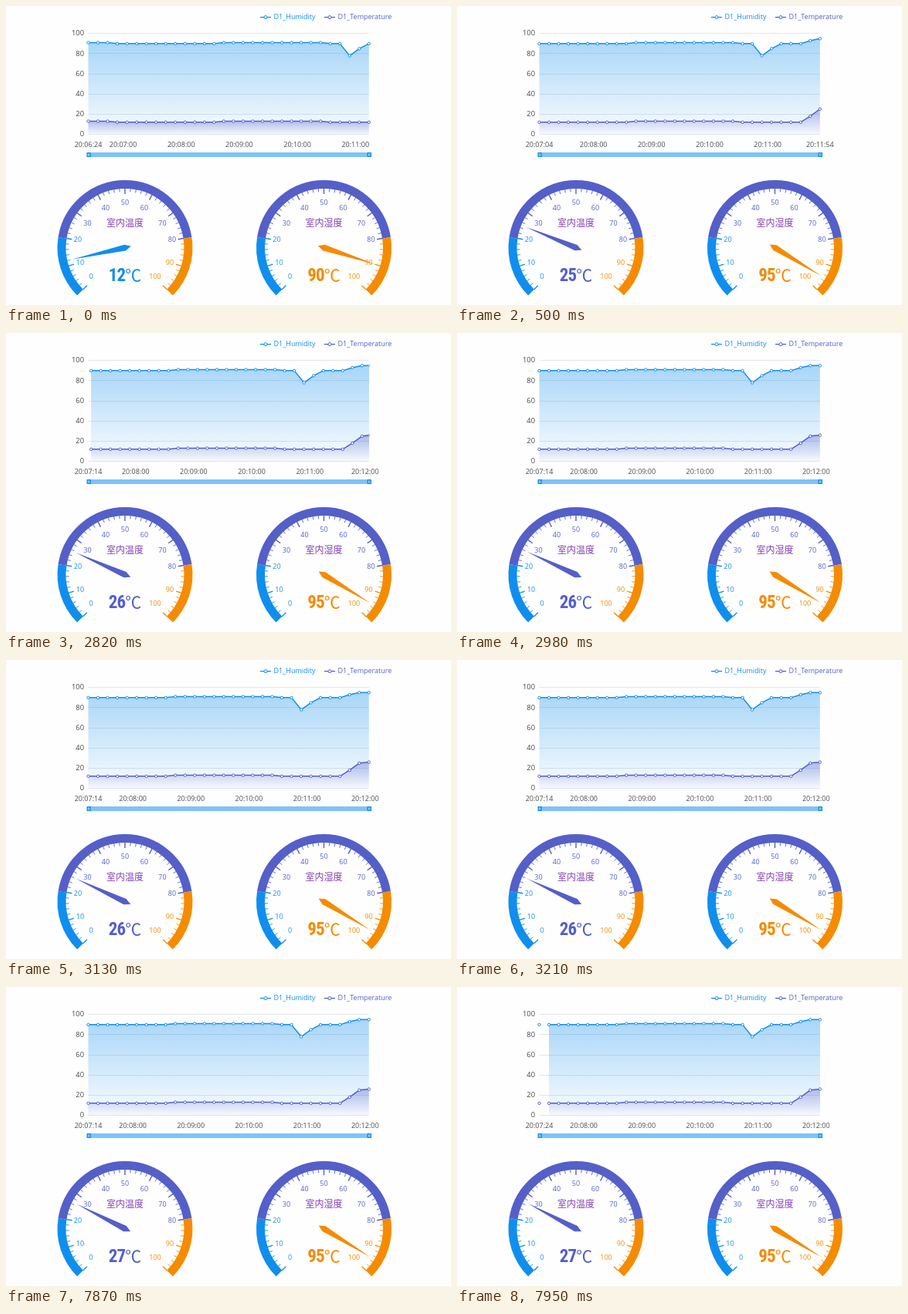
These frames come from a looping animation (576x388 px, 8 s). An HTML page:

```html
<!DOCTYPE html>
<html lang="zh">
<head>
<meta charset="utf-8">
<title>室内温湿度</title>
<style>
  html, body { margin: 0; width: 100%; height: 100%; overflow: hidden; background: #fefefe; }
  svg { display: block; width: 576px; height: 388px; }
  text { font-family: "Open Sans", "Noto Sans", sans-serif; font-size: 9px; text-anchor: middle; }
  .title { font: 12px "Noto Sans CJK SC", "Noto Sans CJK JP", "Noto Sans CJK", sans-serif; }
  .num { font-family: Impact, "Roboto Condensed", "Open Sans Condensed", "Open Sans", sans-serif; font-size: 23px; font-weight: 800; font-stretch: 75%; letter-spacing: -1px; }
  .unit { font: 21px "Noto Sans CJK SC", "Noto Sans CJK JP", "Noto Sans CJK", sans-serif; }
</style>
</head>
<body>
<svg viewBox="0 0 576 388">
  <defs>
    <linearGradient id="humFill" x2="0" y2="1">
      <stop stop-color="#108eee" stop-opacity=".36"/><stop offset="1" stop-color="#108eee" stop-opacity=".02"/>
    </linearGradient>
    <linearGradient id="tempFill" x2="0" y2="1">
      <stop stop-color="#545fc8" stop-opacity=".38"/><stop offset="1" stop-color="#545fc8" stop-opacity=".01"/>
    </linearGradient>
    <clipPath id="plot"><rect x="105.5" y="30" width="364.5" height="140"/></clipPath>
  </defs>
  <g id="base"></g>
  <g id="chart"></g>
  <g id="gauges"></g>
</svg>
<script>
const LOOP = 8000, EASE = 300;
const BLUE = '#108eee', PURPLE = '#545fc8', ORANGE = '#f58b00';
const X0 = 106.5, X1 = 469.8, COUNT = 30, GAP = (X1 - X0) / (COUNT - 1);
const BOTTOM = 166.5;
const FIRST = 384; // seconds after 20:00:00 of the first sample

// moments at which the picture refreshes
const TICKS = [0, 500, 2670, 2750, 2830, 2900, 2980, 7780, 7870, 7950];
// [time, value, eased]
const WINDOW = [[0, 0], [500, 4], [2648, 5, true], [7950, 6, true]];
const TEMP = [[0, 12], [500, 25], [2670, 26, true], [7780, 27, true]];
const HUM = [[0, 90], [500, 95]];

const runs = list => list.flatMap(([v, n]) => Array(n).fill(v));
const humData = runs([[91, 3], [90, 11], [91, 11], [90, 2], [78, 1], [85, 1], [90, 3], [93, 1], [95, 3]]);
const tempData = runs([[13, 3], [12, 11], [13, 11], [12, 7], [18, 1], [25, 1], [26, 1], [27, 1]]);

const $ = id => document.getElementById(id);
const yOf = v => BOTTOM - v * 1.307;
const text = (x, y, s, fill, extra = '') => `<text x="${x}" y="${y}" fill="${fill}" ${extra}>${s}</text>`;
const line = (x1, y1, x2, y2, stroke, w = 1) =>
  `<path d="M${x1} ${y1}L${x2} ${y2}" stroke="${stroke}" stroke-width="${w}"/>`;
const dot = (x, y, color, scale = 1, r = 1.7) =>
  `<circle cx="${x}" cy="${y}" r="${r * scale}" fill="#fff" stroke="${color}" stroke-width="${scale}" opacity="${scale}"/>`;
const range = (n, fn) => Array.from({ length: n }, (_, i) => fn(i)).join('');

function stateAt(steps, t) {
  const i = steps.findLastIndex(s => s[0] <= t);
  const [start, to, eased] = steps[i];
  const p = eased ? 1 - (1 - Math.min(1, (t - start) / EASE)) ** 3 : 1;
  const from = p < 1 ? steps[i - 1][1] : to;
  return { from, to, p, now: from + (to - from) * p };
}

function drawBase() {
  const legend = (x, name, color) =>
    line(x, 14.6, x + 14, 14.6, color, 1.3) + dot(x + 7, 14.6, color, 1, 2) +
    text(x + 17.5, 17.3, name, color, 'style="text-anchor:start"');
  const handle = x =>
    `<rect x="${x - 2.7}" y="190" width="5.4" height="6" rx=".6" fill="${BLUE}"/>` +
    line(x - .8, 191.3, x - .8, 194.7, '#fff', .7) + line(x + .8, 191.3, x + .8, 194.7, '#fff', .7);
  $('base').innerHTML =
    legend(329, 'D1_Humidity', BLUE) + legend(412, 'D1_Temperature', PURPLE) +
    range(6, i => {
      const y = Math.floor(yOf(i * 20)) + .5;
      return line(X0, y, X1, y, '#e2e6ec') +
        text(101, yOf(i * 20) + 2.6, i * 20, '#444', 'style="text-anchor:end;font-size:9.3px"');
    }) +
    `<rect x="${X0}" y="190" width="${X1 - X0}" height="6" fill="#80c2f7"/>` +
    handle(107.2) + handle(470.3);
}

function drawSeries(data, win, color, fill) {
  const { from, to, p, now } = win;
  const xOf = i => X0 + (i - now) * GAP;
  const pts = Array.from({ length: COUNT }, (_, k) => [xOf(to + k), yOf(data[to + k])]);
  const d = 'M' + pts.map(q => q.join(' ')).join('L');
  let out = `<g clip-path="url(#plot)"><path d="${d}V${BOTTOM}H${pts[0][0]}Z" fill="url(#${fill})"/>` +
    `<path d="${d}" fill="none" stroke="${color}" stroke-width="1.5" stroke-linejoin="round"/></g>`;
  out += pts.filter(q => q[0] <= X1 + .1).map(q => dot(...q, color)).join('');
  if (p < 1) out += dot(X0, yOf(data[from]), color, 1 - p) + dot(X1, pts[COUNT - 1][1], color, p);
  return out;
}

function drawTimes({ from, to, now }) {
  const pad = n => String(n).padStart(2, '0');
  const label = (x, s) => text(x, 183.4, `20:${pad(Math.floor(s / 60))}:${pad(s % 60)}`, '#4c4c4c');
  const span = (COUNT - 1) * 10, start = FIRST + to * 10, end = start + span;
  const oldEnd = FIRST + from * 10 + span;
  let out = label(X0, start), s = Math.ceil(start / 60) * 60;
  for (; s <= end; s += 60) {
    const origin = s > oldEnd ? to : now;
    out += label(X0 + ((s - FIRST) / 10 - origin) * GAP, s);
  }
  if (end - (s - 60) > 30) out += label(X1, end);
  return out;
}

const colorOf = v => v <= 20 ? BLUE : v <= 80 ? PURPLE : ORANGE;
const LABELS = [[-44, 37.5], [-58, 19], [-61, -11], [-48.5, -31.5], [-25, -52], [0, -59]];

function drawGauge(cx, title, { to, now }) {
  const cy = 313.6;
  const polar = (v, r) => {
    const a = (225 - v * 2.7) * Math.PI / 180;
    return [cx + r * Math.cos(a), cy - r * Math.sin(a)];
  };
  const arc = (a, b) =>
    `<path d="M${polar(a, 82)}A82 82 0 0 1 ${polar(b, 82)}" fill="none" stroke="${colorOf(b)}" stroke-width="11"/>`;
  const ticks = range(51, i => {
    const major = i % 5 === 0;
    return line(...polar(i * 2, 77), ...polar(i * 2, major ? 69.5 : 72.5), colorOf(i * 2), major ? 1.4 : .9);
  });
  const labels = range(11, i => {
    const [dx, dy] = LABELS[Math.min(i, 10 - i)];
    const x = i === 10 ? 39 : i > 5 ? -dx : dx;
    return text(cx + x, cy + dy + 3.2, i * 10, colorOf(i * 10));
  });
  // a quarter turn of the dial is 100 / 3 units
  const side = 100 / 3;
  const needle = [polar(now, 70), polar(now + side, 4), polar(now, -8), polar(now - side, 4)];
  return arc(0, 20) + arc(20, 80) + arc(80, 100) + ticks + labels +
    `<polygon points="${needle.join(' ')}" fill="${colorOf(to)}"/>` +
    text(cx, 285.6, title, '#8440b4', 'class="title"') +
    text(cx, 356.5, `<tspan class="num">${to}</tspan><tspan class="unit">℃</tspan>`, colorOf(to));
}

function draw(t) {
  const win = stateAt(WINDOW, t);
  $('chart').innerHTML = drawSeries(humData, win, BLUE, 'humFill') +
    drawSeries(tempData, win, PURPLE, 'tempFill') + drawTimes(win);
  $('gauges').innerHTML = drawGauge(154, '室内温度', stateAt(TEMP, t)) +
    drawGauge(411.5, '室内湿度', stateAt(HUM, t));
}

let shown = -1;
const origin = performance.now();
function frame() {
  const t = (performance.now() - origin) % LOOP;
  const tick = TICKS.findLast(s => s <= t);
  if (tick !== shown) draw(shown = tick);
  requestAnimationFrame(frame);
}
drawBase();
frame();
</script>
</body>
</html>
```
